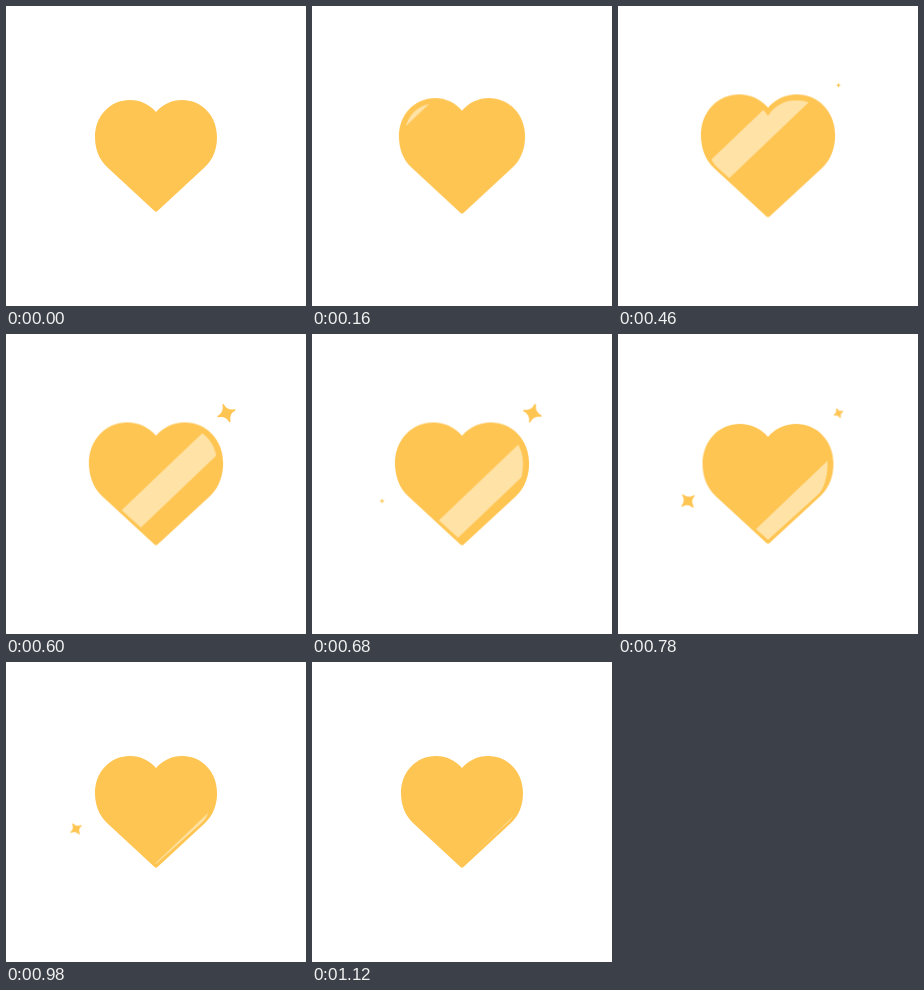
Recreate the animation shown at these times as an HTML page. Size 300 by 300 pixels, loop 1620 ms.

```html
<!DOCTYPE html>
<html lang="en">
<head>
<meta charset="utf-8">
<title>Shining heart</title>
<style>
  :root { --gold: #ffc552; --shine: #fee2a6; --loop: 1620ms; }
  html, body { margin: 0; width: 100%; height: 100%; overflow: hidden; background: #fff; }
  svg { display: block; width: 100%; height: 100%; }

  .heart { animation: swell var(--loop) infinite; }
  .body { fill: var(--gold); }
  .band { fill: var(--shine); animation: sweep var(--loop) infinite; }
  .star {
    fill: var(--gold);
    stroke: var(--gold);
    stroke-width: 1.6;
    stroke-linejoin: round;
    animation: twinkle var(--loop) infinite backwards, spin var(--loop) linear infinite backwards;
  }
  .late { animation-delay: 220ms; }

  @keyframes swell {
    0% { transform: scale(1); animation-timing-function: cubic-bezier(.4, 0, .6, 1); }
    24.69% { transform: scale(1.1); }
    40.74% { transform: scale(1.1); animation-timing-function: cubic-bezier(.4, 0, .6, 1); }
    61.73%, 100% { transform: scale(1); }
  }
  @keyframes sweep {
    0% { transform: translateY(-122px); animation-timing-function: cubic-bezier(.4, 0, .48, 1); }
    67.9%, 100% { transform: translateY(53.4px); }
  }
  /* half a sine wave: grow, then shrink */
  @keyframes twinkle {
    0% { scale: 0; }
    26.54% { scale: 0; animation-timing-function: cubic-bezier(.39, .575, .565, 1); }
    39.81% { scale: 1; animation-timing-function: cubic-bezier(.47, 0, .745, .715); }
    53.09%, 100% { scale: 0; }
  }
  @keyframes spin {
    0%, 26.54% { rotate: -105deg; }
    53.09%, 100% { rotate: 105deg; }
  }
</style>
</head>
<body>
<svg viewBox="0 0 300 300">
  <defs>
    <clipPath id="inset">
      <path d="M0-36.5C-5.5-45.5-15-50.8-26-50.8C-43-50.8-55.5-37-55.5-19C-55.5-7-52 5-47 9.5L0 52L47 9.5C52 5 55.5-7 55.5-19C55.5-37 43-50.8 26-50.8C15-50.8 5.5-45.5 0-36.5Z"/>
    </clipPath>
    <path id="spark" d="M0-9.3Q1.2-1.2 9.3 0Q1.2 1.2 0 9.3Q-1.2 1.2-9.3 0Q-1.2-1.2 0-9.3Z"/>
  </defs>
  <g transform="translate(150 150)">
    <g class="heart">
      <path class="body" d="M0-44C-6.5-51.5-15.5-56-26-56C-46-56-61-40-61-19C-61-7-57 3.5-49 11L-1.5 55Q0 56.3 1.5 55L49 11C57 3.5 61-7 61-19C61-40 46-56 26-56C15.5-56 6.5-51.5 0-44Z"/>
      <g clip-path="url(#inset)">
        <path class="band" d="M-80 76.4L80-76.4V-43.9L-80 108.9Z"/>
      </g>
    </g>
  </g>
  <g transform="translate(220.5 79.2)"><use class="star" href="#spark"/></g>
  <g transform="translate(70 167)"><use class="star late" href="#spark"/></g>
</svg>
</body>
</html>
```
